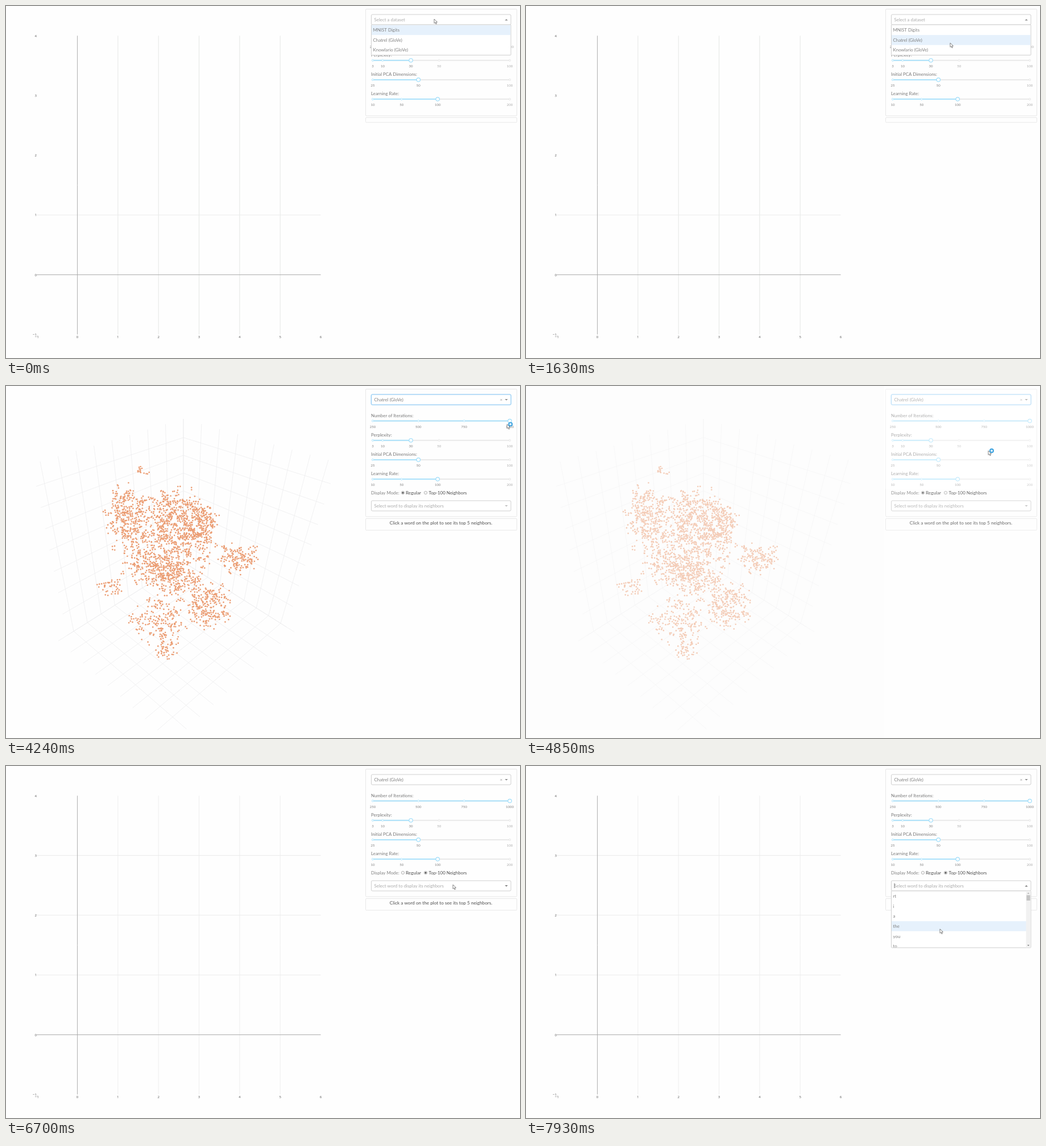
An HTML page with a canvas for the animation above (8 s loop, 904 px wide and 620 px high).

```html
<!DOCTYPE html>
<html lang="en">
<head>
<meta charset="utf-8">
<title>Embedding explorer</title>
<style>
html, body { margin: 0; width: 100%; height: 100%; overflow: hidden; background: #fefefe; }
canvas { display: block; width: 904px; height: 620px; }
</style>
</head>
<body>
<canvas id="stage"></canvas>
<script>
const W = 904, H = 620, LOOP = 8000, BG = '#fefefe';
const canvas = document.getElementById('stage');
const ctx = canvas.getContext('2d');
const dpr = window.devicePixelRatio || 1;
canvas.width = W * dpr;
canvas.height = H * dpr;

const DATASETS = ['MNIST Digits', 'Chatrel (GloVe)', 'Knowlario (GloVe)'];
const WORDS = ['rt', 'i', 'a', 'the', 'you', 'to'];
const ROW = 17.6;

// Moments of the story, in ms
const PICK = 2025, LOADED = 3105, GRAB = 3530, DROP = 3950, FADE = 4240, RELOADED = 5745;
const RADIO = 5900, FLAT = 6200, OPEN = 6845;

// Pointer moves: start, end, destination
const MOVES = [[0, 960, 748, 76], [1255, 1630, 746, 65], [3030, 3390, 727, 61], [GRAB, DROP, 889, 62],
  [4090, 4850, 813, 114], [4850, 5180, 745, 178], [5180, 5470, 788, 187], [6070, 6690, 786, 209],
  [OPEN, 7540, 728, 287]];

const mix = (a, b, k) => a + (b - a) * k;
const mixPt = (p, q, k) => [mix(p[0], q[0], k), mix(p[1], q[1], k)];
const clamp = (v, a, b) => Math.max(a, Math.min(b, v));
const smooth = k => k * k * (3 - 2 * k);
const progress = (t, a, b) => clamp((t - a) / (b - a), 0, 1);

// Word groups: centre x, y, radius x, y, count
const GROUPS = [[240, 150, 11, 9, 16], [213, 225, 36, 46, 310], [300, 230, 54, 46, 420],
  [345, 238, 26, 32, 160], [285, 285, 80, 48, 480], [265, 322, 52, 32, 230], [310, 345, 48, 28, 170],
  [408, 303, 37, 25, 150], [184, 354, 19, 17, 42], [355, 388, 41, 37, 240], [272, 415, 46, 42, 190],
  [280, 462, 24, 25, 50]];
const shift = ([x, y, rx, ry, n]) => [x * 0.98, 155 + (y - 155) * 1.12, rx, ry * 1.1, n];

// Soft-edged groups in which words often sit right beside the one before
function scatter(groups, seed) {
  const rnd = () => (seed = (seed * 16807) % 2147483647) / 2147483647;
  const pts = [];
  for (const [cx, cy, rx, ry, n] of groups) {
    let x, y;
    for (let i = 0; i < n; i++) {
      const a = rnd() * Math.PI * 2, r = (rnd() + rnd()) * 0.62;
      const beside = i > 0 && rnd() < 0.35;
      x = beside ? x + Math.cos(a) * 4 : cx + Math.cos(a) * r * rx;
      y = beside ? y + Math.sin(a) * 4 : cy + Math.sin(a) * r * ry;
      pts.push([x, y]);
    }
  }
  return pts;
}

// Each box: left edge, back corner and right edge as [top, bottom], plus the front floor corner
const BEFORE = {
  pts: scatter(GROUPS, 4211),
  left: [[60, 133], [119, 432]], back: [[312, 58], [312, 310]], right: [[567, 130], [483, 418]],
  front: [293, 583], nl: 8, nr: 8, nh: 7, first: 0.13
};
const AFTER = {
  pts: scatter(GROUPS.map(shift), 977),
  left: [[45, 138], [110, 452]], back: [[322, 55], [322, 312]], right: [[550, 122], [467, 405]],
  front: [280, 592], nl: 5, nr: 7, nh: 4, first: 0.165
};

function line(p, q, color, width = 1) {
  ctx.beginPath();
  ctx.moveTo(...p);
  ctx.lineTo(...q);
  ctx.strokeStyle = color;
  ctx.lineWidth = width;
  ctx.stroke();
}

function box(x, y, w, h, stroke, fill = BG, r = 1.5) {
  ctx.beginPath();
  ctx.roundRect(x, y, w, h, r);
  ctx.fillStyle = fill;
  ctx.fill();
  ctx.strokeStyle = stroke;
  ctx.lineWidth = 1;
  ctx.stroke();
}

function disc(x, y, r, fill, stroke, width = 1) {
  ctx.beginPath();
  ctx.arc(x, y, r, 0, Math.PI * 2);
  ctx.fillStyle = fill;
  ctx.fill();
  if (!stroke) return;
  ctx.strokeStyle = stroke;
  ctx.lineWidth = width;
  ctx.stroke();
}

function text(str, x, y, color = '#808080', size = 7.9, align = 'left', family = 'Lato') {
  ctx.font = `${size}px "${family}", sans-serif`;
  ctx.textAlign = align;
  ctx.fillStyle = color;
  ctx.fillText(str, x, y);
}

function triangle(x, y, up, color = '#999', s = 2.6) {
  const d = up ? -1 : 1;
  ctx.beginPath();
  ctx.moveTo(x - s, y - d * s / 2);
  ctx.lineTo(x + s, y - d * s / 2);
  ctx.lineTo(x, y + d * s / 2);
  ctx.fillStyle = color;
  ctx.fill();
}

function drawAxes(allRows) {
  const X = v => 125.5 + v * 71.35, Y = v => 473.3 - v * 105.25;
  const label = v => String(v).replace('-', '\u2212');
  for (let v = -1; v <= 6; v++) {
    if (v > 0 && v < 6) line([X(v), Y(4)], [X(v), Y(-1)], allRows ? '#efefef' : '#e5e7e5');
    text(label(v), X(v), 585, '#555', 6.1, 'center', 'Open Sans');
  }
  for (let v = -1; v <= 4; v++) {
    if (v === 1 || (allRows && v > 1 && v < 4)) line([X(-1), Y(v)], [X(6), Y(v)], '#ebebeb');
    text(label(v), 54, Y(v) + 2.2, '#555', 6.1, 'right', 'Open Sans');
  }
  line([X(0), Y(4)], [X(0), Y(-1)], '#b0b0b0');
  line([X(-1), Y(0)], [X(6), Y(0)], '#a8a8a8');
}

function drawCloud(s) {
  const rule = (p, q, to = 1) => line(p, mixPt(p, q, to), '#ebebed', 0.7);
  const wall = (edge, n) => {
    for (let i = 0; i <= n; i++)
      rule(mixPt(s.back[0], edge[0], i / n), mixPt(s.back[1], edge[1], i / n));
    for (let i = 0; i <= s.nh; i++) {
      const k = mix(s.first, 1, i / s.nh);
      rule(mixPt(...s.back, k), mixPt(...edge, k), 1.06);
    }
  };
  wall(s.left, s.nl);
  wall(s.right, s.nr);
  const [b, l, r] = [s.back[1], s.left[1], s.right[1]];
  for (let i = 0; i <= s.nr; i++) rule(mixPt(b, r, i / s.nr), mixPt(l, s.front, i / s.nr), 1.14);
  for (let i = 0; i <= s.nl; i++) rule(mixPt(b, l, i / s.nl), mixPt(r, s.front, i / s.nl), 1.14);
  for (const [x, y] of s.pts) disc(x, y, 1.35, '#eb9d73');
}

const tickX = (v, ticks) => 645 + 241 * (v - ticks[0]) / (ticks[ticks.length - 1] - ticks[0]);

function slider(name, y, ticks, value) {
  const BLUE = '#abe2fb', GREY = '#e9e9e9', knob = tickX(value, ticks);
  text(name, 642, y - 7, '#787878');
  line([645, y], [886, y], GREY, 2);
  line([645, y], [knob, y], BLUE, 2);
  for (const v of ticks) {
    const on = v <= value, x = tickX(v, ticks);
    disc(x, y, 1.6, '#fff', on ? BLUE : '#e2e2e2', 0.9);
    text(v, x, y + 12.2, on ? '#808080' : '#aaa', 6, 'center');
  }
  disc(knob, y, 3.2, '#fff', '#9eddfa', 1.2);
}

function select(y, str, { open, focus, clear, color = '#aaa', arrow = '#888' } = {}) {
  if (focus) box(641.8, y - 0.7, 246.9, 19.4, '#d6ecfb', BG, 2.5);
  box(642.5, y, 245.5, 18, focus ? '#85c5f2' : '#cfcfcf', '#fff', 2);
  text(str, 647.5, y + 11.6, color);
  if (clear) text('\u00d7', 871, y + 11.6, '#999', 7.5, 'center');
  triangle(880, y + 9.2, open, arrow);
}

function menu(y, h, items, pointerY, right) {
  const active = clamp(Math.floor((pointerY - y) / ROW), 0, items.length - 1);
  box(642.5, y, 245.5, h, '#cfcfcf', '#fff', 1);
  ctx.save();
  ctx.beginPath();
  ctx.rect(643, y + 0.5, 244.5, h - 1);
  ctx.clip();
  items.forEach((item, i) => {
    const top = y + 0.5 + i * ROW;
    if (i === active) {
      ctx.fillStyle = '#e6f1fc';
      ctx.fillRect(643, top, right - 643, ROW);
    }
    text(item, 645.5, top + 11.6);
  });
  ctx.restore();
}

function scrollbar() {
  ctx.fillStyle = '#f1f1f1';
  ctx.fillRect(879.5, 220, 8, 99.5);
  ctx.fillStyle = '#c4c4c4';
  ctx.fillRect(880.3, 227.5, 6.4, 9.5);
  triangle(883.5, 224, true, '#aaa', 1.8);
  triangle(883.5, 316, false, '#777', 1.8);
}

function radio(x, on) {
  disc(x, 188, 2.7, '#f4f4f4', '#aaa', 0.8);
  if (on) disc(x, 188, 1.5, '#444');
}

function veil(x, y, w, h, alpha) {
  ctx.fillStyle = `rgba(254,254,254,${alpha})`;
  ctx.fillRect(x, y, w, h);
}

function pointer(x, y, busy) {
  const shape = [[0, 0], [0, 7.4], [1.8, 5.9], [3.1, 8.8], [4.4, 8.2], [3.1, 5.5], [5.5, 5.3]];
  ctx.beginPath();
  shape.forEach(([dx, dy]) => ctx.lineTo(x + dx, y + dy));
  ctx.closePath();
  ctx.fillStyle = '#fff';
  ctx.fill();
  ctx.strokeStyle = '#666';
  ctx.lineWidth = 0.8;
  ctx.stroke();
  if (busy) disc(x + 6, y, 3, '#e4f4fd', '#38a0de', 1.9);
}

const pointerAt = t => MOVES.reduce(
  (pos, [a, b, x, y]) => mixPt(pos, [x, y], smooth(progress(t, a, b))), [753, 23]);

function drawPanel(t, [px, py]) {
  const loaded = t >= LOADED;
  box(632.5, 5.5, 266, loaded ? 224.5 : 188, '#e8e8e8');
  box(632.5, loaded ? 233.5 : 196.5, 266, loaded ? 20.5 : 8.5, '#e8e8e8');

  // While dragged, the knob jumps to the mark nearest the pointer
  const marks = [250, 500, 750, 1000];
  const dragX = clamp(px, 725, 886);
  const dragged = marks[Math.round((dragX - 645) / 241 * 3)];
  slider('Number of Iterations:', 61.5, marks, t < GRAB ? 500 : t < DROP ? dragged : 1000);
  slider('Perplexity:', 95.7, [3, 10, 30, 50, 100], 30);
  slider('Initial PCA Dimensions:', 129.9, [25, 50, 100], 50);
  slider('Learning Rate:', 164.1, [10, 50, 100, 200], 100);

  if (t >= PICK) {
    select(15, DATASETS[1], { focus: t < RELOADED, clear: t >= LOADED + 140, color: '#808080' });
  } else {
    select(15, 'Select a dataset', { open: true });
    menu(33, 53.5, DATASETS, py, 887.5);
  }
  if (!loaded) return;

  const neighbors = t >= RADIO, open = t >= OPEN;
  text('Display Mode:', 642, 191);
  radio(698, !neighbors);
  text('Regular', 703, 191, '#4c4c4c', 8.2);
  radio(738, neighbors);
  text('Top-100 Neighbors', 743.5, 191, '#4c4c4c');
  text('Click a word on the plot to see its top 5 neighbors.', 765, 244.3, '#4c4c4c', 8.2, 'center');
  select(202, 'Select word to display its neighbors', { open, arrow: neighbors ? '#777' : '#bbb' });
  if (!open) return;
  menu(220, 100, WORDS, py, 880);
  scrollbar();
  if ((t - OPEN) % 1000 < 500 || t > 7800) line([648, 206.5], [648, 215], '#555', 0.8);
}

function draw(t) {
  ctx.setTransform(dpr, 0, 0, dpr, 0, 0);
  ctx.fillStyle = BG;
  ctx.fillRect(0, 0, W, H);
  const pos = pointerAt(t);

  if (t < LOADED || t >= FLAT) drawAxes(t >= FLAT);
  else drawCloud(t < RELOADED ? BEFORE : AFTER);
  drawPanel(t, pos);

  const busy = t >= FADE && t < RELOADED;
  if (busy) {
    const k = progress(t, FADE, FADE + 500);
    veil(0, 0, 630, H, 0.5 * k);
    veil(630, 0, 274, 181, 0.4 * k);
    veil(630, 181, 274, 80, 0.15 * k);
  }
  pointer(...pos, busy);
}

const start = performance.now();
function tick() {
  draw((performance.now() - start) % LOOP);
  requestAnimationFrame(tick);
}
tick();
</script>
</body>
</html>
```
